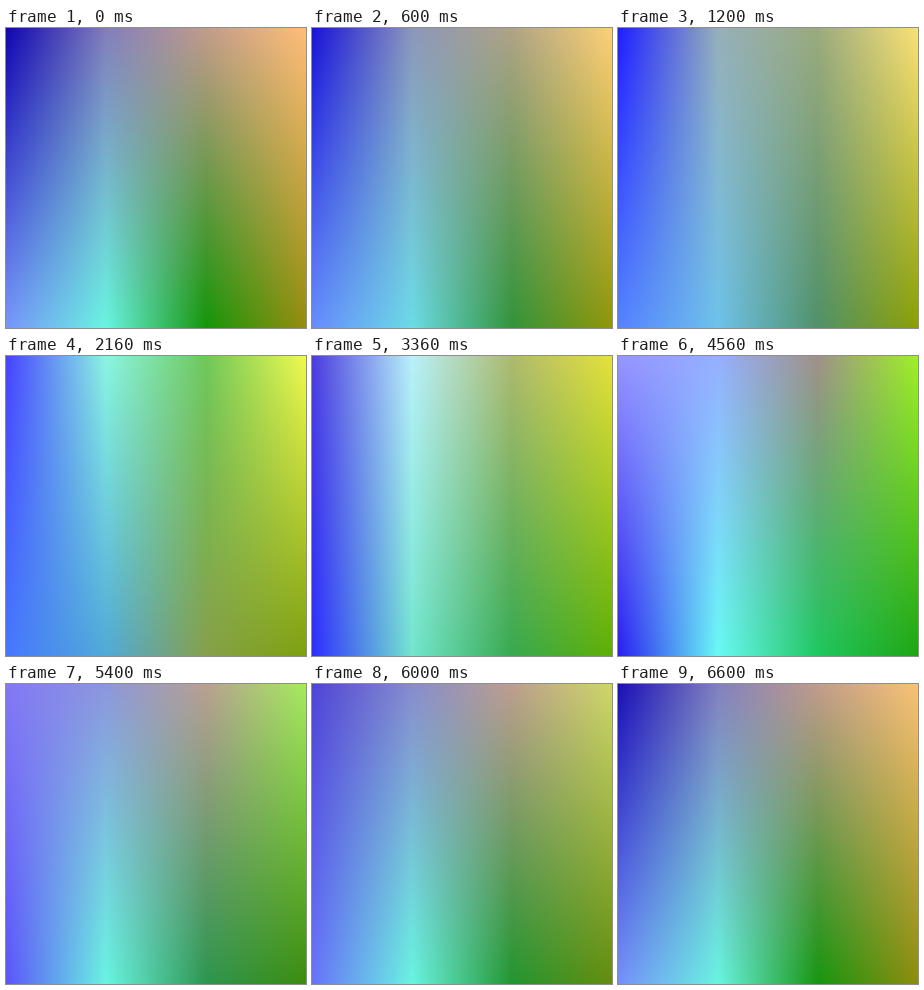
An HTML page that plays this animation: 300 by 300 pixels, repeating every 6720 ms.

```html
<!DOCTYPE html>
<html lang="en">
<head>
<meta charset="utf-8">
<title>Drifting colour mesh</title>
<style>
  html, body { margin: 0; width: 100%; height: 100%; overflow: hidden; }
  div { position: fixed; inset: 0; }
  /* Fading the upper gradient over the lower one gives a bilinear blend. */
  #upper {
    -webkit-mask-image: linear-gradient(#000, transparent);
    mask-image: linear-gradient(#000, transparent);
  }
</style>
</head>
<body>
<div id="lower"></div>
<div id="upper"></div>
<script>
const LOOP = 6720, STEP = 120;

// Colours at 0, 1/3, 2/3 and 1 of the width, along the top and bottom edges.
const keys = [
  { at: 0,    upper: '#0f05af #827dbb #c39b8c #ffbe78', lower: '#7896fa #69f5e1 #14960a #968c0f' },
  { at: 1200, upper: '#1e1eff #96afb9 #9baa7d #fae178', lower: '#5582ff #6ec3eb #509169 #8ca005' },
  { at: 2160, upper: '#4641ff #8cf5e1 #6ec85a #f0fa50', lower: '#4678ff #50aad7 #87a04b #7da00f' },
  { at: 3360, upper: '#4b3cdc #b9f0fa #afb96e #e6e13c', lower: '#2d2dff #73e6cd #37aa50 #5faf05' },
  { at: 4560, upper: '#9696ff #96afff #a09187 #a0f028', lower: '#281ef0 #69faf5 #1ec85f #1ea514' },
  { at: 5400, upper: '#8278f5 #8c96dc #b9a091 #a5eb5f', lower: '#5a55fa #69f5e1 #2d9650 #3c8c0f' },
];

const parse = text => text.split(' ').map(hex =>
  [1, 3, 5].map(i => parseInt(hex.slice(i, i + 2), 16)));
for (const key of keys) {
  key.upper = parse(key.upper);
  key.lower = parse(key.lower);
}
keys.push({ ...keys[0], at: LOOP });

const mix = (a, b, k) => a + (b - a) * k;

function paint(time) {
  const next = keys.findIndex(key => key.at > time);
  const from = keys[next - 1], to = keys[next];
  const k = (time - from.at) / (to.at - from.at);
  for (const edge of ['upper', 'lower']) {
    const stops = from[edge].map((colour, i) =>
      `rgb(${colour.map((v, c) => Math.round(mix(v, to[edge][i][c], k)))})`);
    document.getElementById(edge).style.background =
      `linear-gradient(to right, ${stops.join(', ')})`;
  }
}

const start = performance.now();
function tick() {
  const time = (performance.now() - start) % LOOP;
  paint(Math.floor(time / STEP) * STEP);
  requestAnimationFrame(tick);
}
tick();
</script>
</body>
</html>
```
